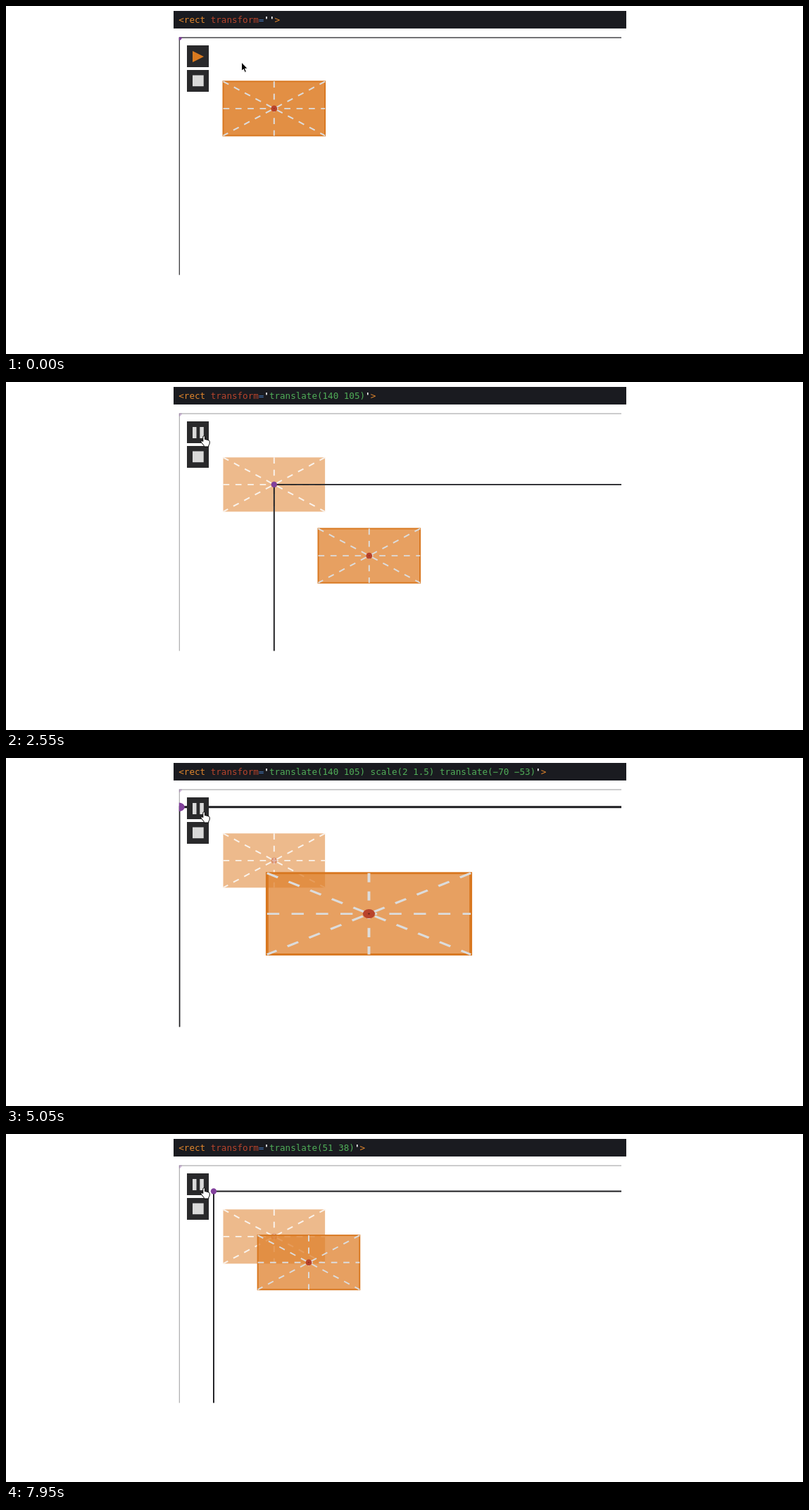
Animation, 1132 px wide and 495 px high, one loop 8 s. Source, as an HTML page:

```html
<!DOCTYPE html>
<html lang="en">
<head>
<meta charset="utf-8">
<title>Chained SVG transforms</title>
<style>
  html, body { margin: 0; width: 100%; height: 100%; overflow: hidden; background: #fff; }
  svg { display: block; }
  .code { font: 12.57px "DejaVu Sans Mono", "Liberation Mono", monospace; white-space: pre; }
  .tag { fill: #e1862c; }
  .attr { fill: #b8442c; }
  .eq { fill: #3f6ea8; }
  .quote { fill: #fff; font-weight: bold; }
  .value { fill: #50ae58; }
  .box { fill: #df812c; fill-opacity: .748; }
  .edge { fill: none; stroke: #d8771f; stroke-width: 2; }
  .dash { fill: none; stroke: #dcdcdc; stroke-width: 2; stroke-dasharray: 9 9; }
  .axis { fill: none; stroke: #1c1c20; stroke-width: 2; }
  .btn { fill: #29292b; }
  .icon { fill: #d9d9d9; }
  .cursor { stroke-linejoin: round; }
</style>
</head>
<body>
<svg width="1132" height="495" viewBox="0 0 1132 495">
  <defs>
    <clipPath id="view"><rect width="651.5" height="350.5"/></clipPath>
    <path id="guides" d="M65 105H215M140 65V145M65 65L215 145M215 65L65 145"/>
  </defs>

  <rect x="238" y="7" width="643" height="25" fill="#1a1b20"/>
  <text class="code" x="245.3" y="24"><tspan class="tag">&lt;rect </tspan><tspan class="attr">transform</tspan><tspan class="eq">=</tspan><tspan class="quote">'</tspan><tspan class="value" id="value"></tspan><tspan class="quote">'</tspan><tspan class="tag">&gt;</tspan></text>

  <g transform="translate(245.8 44.6) scale(.9643)">
    <g clip-path="url(#view)">
      <path class="axis" d="M700 0H0V400" opacity=".45"/>
      <circle r="4.3" fill="#81409c" opacity=".3"/>
      <g>
        <rect class="box" x="65" y="65" width="150" height="80" style="fill-opacity:.545"/>
        <use href="#guides" class="dash" style="stroke:#faf3ec"/>
        <circle cx="140" cy="105" r="4.5" fill="#b8432c" opacity=".35"/>
      </g>
      <g id="moving">
        <path class="axis" d="M1500 0H0V1000"/>
        <circle r="4.3" fill="#81409c"/>
        <rect class="box" x="65" y="65" width="150" height="80"/>
        <rect class="edge" x="65" y="65" width="150" height="80"/>
        <use href="#guides" class="dash"/>
        <circle cx="140" cy="105" r="4.5" fill="#b8432c"/>
        <circle cx="140" cy="105" r=".7" fill="#64271a"/>
      </g>
    </g>
  </g>

  <rect class="btn" x="257" y="56" width="31" height="31"/>
  <rect class="btn" x="257" y="91" width="31" height="31"/>
  <path id="play" d="M265 64L281 72L265 80Z" fill="#d97a20"/>
  <path id="pause" class="icon" d="M265 64h5.5v16h-5.5zM275.3 64h5.5v16h-5.5z"/>
  <path class="icon" d="M265 98.500h15.700v15.700h-15.700z"/>

  <path id="arrow" class="cursor" fill="#000" stroke="#fff" d="M0 0V12.500L2.800 9.900L4.800 14.400L6.900 13.500L5 9.100H8.800Z"/>
  <path id="hand" class="cursor" fill="#fff" stroke="#000" d="M-1.200 7.500V1Q-1 -.3 .3 -.3Q1.500 -.1 1.600 1V4.800Q3.200 4 4 5.300Q5.600 4.600 6.200 6Q8 5.700 8.200 7.500V10Q8 12.200 6.800 13V15H.2V13.500L-4 8.300Q-4.500 6.600 -3 6.500Z"/>
</svg>

<script>
  const LOOP = 8000;
  const CX = 140, CY = 105;
  const CLICK = 390, RESET = 6950;
  // [start, duration] of each stage in ms
  const STAGE = {
    out: [CLICK, 1385],
    grow: [2575, 1076],
    back: [4375, 1350],
    shrink: [6100, 850],
    again: [7250, 1700]
  };
  const el = id => document.getElementById(id);
  const clamp = u => Math.min(1, Math.max(0, u));
  const ease = u => (1 - Math.cos(Math.PI * u)) / 2;
  const progress = (t, [start, length]) => ease(clamp((t - start) / length));
  const show = (id, on) => el(id).setAttribute('visibility', on ? 'visible' : 'hidden');
  const place = (id, x, y) => el(id).setAttribute('transform', `translate(${x} ${y})`);
  const whole = n => String(Math.round(n)).replace('-', '\u2212');
  const fixed = n => String(+n.toFixed(2));
  const call = (name, x, y, format) => `${name}(${format(x)} ${format(y)})`;

  function chain(t) {
    const first = t < RESET;
    const out = progress(t, first ? STAGE.out : STAGE.again);
    const size = first ? progress(t, STAGE.grow) - progress(t, STAGE.shrink) : 0;
    const back = first ? progress(t, STAGE.back) : 0;
    const steps = [];
    if (t >= CLICK) steps.push(['translate', CX * out, CY * out, whole]);
    if (first && t >= STAGE.grow[0]) steps.push(['scale', 1 + size, 1 + size / 2, fixed]);
    if (first && t >= STAGE.back[0]) steps.push(['translate', -CX * back, -CY * back, whole]);
    return steps;
  }

  function draw(t) {
    const steps = chain(t);
    el('value').textContent = steps.map(s => call(...s)).join(' ');
    el('moving').setAttribute('transform', steps.map(([n, x, y]) => call(n, x, y, v => v.toFixed(5))).join(' '));

    const glide = progress(t, [40, 290]);
    const x = 334.5 - 53.500 * glide, y = 80 - 3 * glide;
    const over = x < 288;
    place('arrow', x, y);
    place('hand', x, y);
    show('arrow', !over);
    show('hand', over);
    show('play', t < CLICK);
    show('pause', t >= CLICK);
  }

  function tick() {
    draw(performance.now() % LOOP);
    requestAnimationFrame(tick);
  }
  tick();
</script>
</body>
</html>
```
